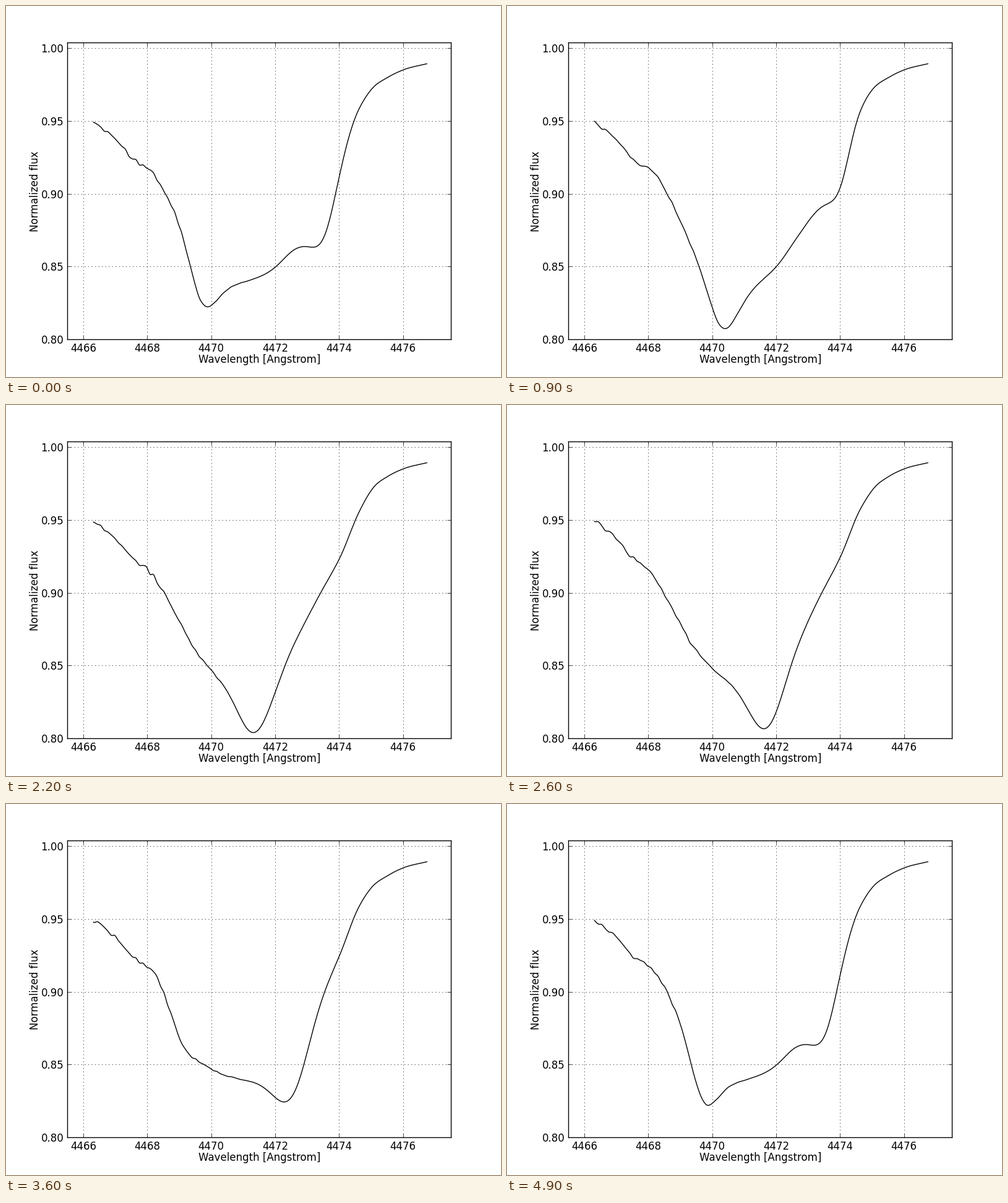
Animation of 800 by 600 pixels, one loop 5000 ms. Source, as a matplotlib script:

```python
import numpy as np
import matplotlib.pyplot as plt
from matplotlib.animation import FuncAnimation
from matplotlib.ticker import FormatStrFormatter, MultipleLocator
from matplotlib.transforms import Affine2D

WIDTH, HEIGHT = 800, 600
FRAMES, INTERVAL = 50, 100
CYCLE = 49  # frames in one pulsation; the last frame closes the cycle

plt.rcParams.update({
    "font.family": "DejaVu Sans",
    "font.size": 12,
    "xtick.direction": "in",
    "ytick.direction": "in",
})


def hermite(x, knots, values):
    """Smooth cubic curve through the given points."""
    slopes = np.gradient(values, knots)
    i = np.clip(np.searchsorted(knots, x) - 1, 0, len(knots) - 2)
    step = knots[i + 1] - knots[i]
    u = (x - knots[i]) / step
    return ((1 + 2 * u) * (1 - u) ** 2 * values[i]
            + u * (1 - u) ** 2 * step * slopes[i]
            + u ** 2 * (3 - 2 * u) * values[i + 1]
            + u ** 2 * (u - 1) * step * slopes[i + 1])


def sigmoid(x):
    return 1 / (1 + np.exp(-x))


# Wavelengths are offsets from 4400 Angstrom, flux is in thousandths.
wave = np.linspace(66.3, 76.73, 600)

# The undisturbed absorption line.
LINE_POINTS = np.array([
    (66.3, 949.5), (66.9, 939.5), (67.5, 925), (68.2, 914), (68.8, 891),
    (69.2, 873), (69.6, 859), (70, 850), (70.5, 844.5), (71.2, 843.5),
    (72, 853), (72.6, 871.5), (73.4, 902), (74, 927), (74.6, 959),
    (75, 972.4), (75.5, 980.4), (76, 985.7), (76.73, 989.8)])
line = hermite(wave, *LINE_POINTS.T)

# A dip travels across the line: its depth and time of passage, in cycles.
depth = 40 * sigmoid((wave - 69.2) / 0.4) * sigmoid((74.08 - wave) / 0.27)
offset = wave - 71.8
passage = 0.56 + 0.24 * offset + 0.0045 * offset ** 3
SHARPNESS = 1.5


def ripple(frame):
    """Small noise, fading out towards the line centre."""
    knots = np.arange(66.2, 77, 0.11)
    fade = np.clip((71.2 - knots) / 3, 0, 1)
    noise = np.random.default_rng(100 + frame).normal(0, 0.75, knots.size)
    return hermite(wave, knots, noise * fade)


def flux_at(frame):
    angle = 2 * np.pi * (frame / CYCLE - passage)
    pulse = np.exp(SHARPNESS * (np.cos(angle) - 1))
    return (line - depth * pulse + ripple(frame)) / 1000


fig = plt.figure(figsize=(WIDTH / 100, HEIGHT / 100), dpi=100,
                 facecolor="white")
ax = fig.add_axes([99 / WIDTH, 61 / HEIGHT, 620 / WIDTH, 480 / HEIGHT])
ax.set(xlim=(4465.5, 4477.5), ylim=(0.8, 1.004))
ax.xaxis.set_major_locator(MultipleLocator(2))
ax.yaxis.set_major_locator(MultipleLocator(0.05))
ax.xaxis.set_major_formatter(FormatStrFormatter("%d"))
ax.yaxis.set_major_formatter(FormatStrFormatter("%.2f"))
ax.tick_params(length=4, width=0.5, pad=4, top=True, right=True)
ax.grid(color="black", linewidth=0.5, linestyle=(0, (2, 6)))
ax.set_axisbelow(True)
for spine in ax.spines.values():
    spine.set_linewidth(1)

fig.text(410 / WIDTH, 23 / HEIGHT, "Wavelength [Angstrom]", ha="center",
         va="baseline")
fig.text(52 / WIDTH, 0.5, "Normalized flux", rotation=90, ha="center",
         va="baseline", rotation_mode="anchor")

# The frame and grid snap to whole pixels; the curve sits one pixel off them.
curve, = ax.plot(4400 + wave, flux_at(0), color="black", linewidth=1,
                 transform=ax.transData + Affine2D().translate(1, -1))


def update(frame):
    curve.set_ydata(flux_at(frame))
    return curve,


animation = FuncAnimation(fig, update, frames=FRAMES, interval=INTERVAL,
                          repeat=True, repeat_delay=0)
plt.show()
```
